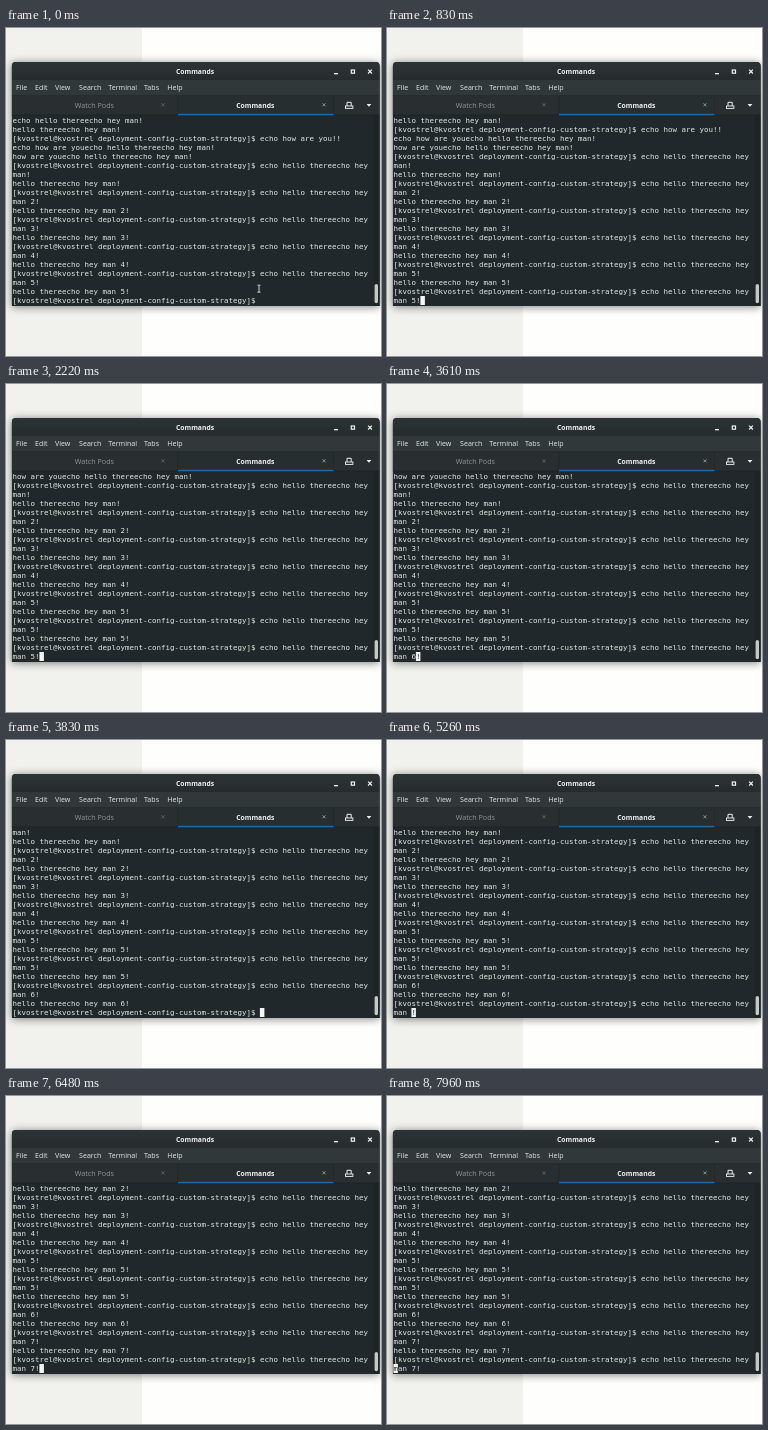
Recreate the animation shown at these times as an HTML page with a canvas. Size 375 px wide and 328 px high, loop 8000 ms.

```html
<!DOCTYPE html>
<html lang="en">
<head>
<meta charset="utf-8">
<title>Terminal</title>
<style>
  html, body { margin: 0; width: 100%; height: 100%; overflow: hidden; background: #fefefc; }
  canvas { display: block; }
</style>
</head>
<body>
<canvas id="stage" width="375" height="328"></canvas>
<script>
const ctx = document.getElementById('stage').getContext('2d');
const LOOP = 8000, COLS = 80, ROWS = 21;
const CELL_W = 4.5, CELL_H = 9, LEFT = 6.4, TOP = 88;
const MONO = '"DejaVu Sans Mono", monospace';
const SANS = '"Open Sans", "Noto Sans", sans-serif';
const BACK = '#21282b', INK = '#e2e7e4', ICON = '#eef1ef';
const PROMPT = '[kvostrel@kvostrel deployment-config-custom-strategy]$ ';
const GREETING = 'hello thereecho hey man';

// ---- Shell session ----
const echoed = n => [`${PROMPT}echo ${GREETING}${n}!`, `${GREETING}${n}!`];
const history = [
  `echo ${GREETING}!`,
  `${GREETING}!`,
  `${PROMPT}echo how are you!!`,
  `echo how are youecho ${GREETING}!`,
  `how are youecho ${GREETING}!`,
  ...['', ' 2', ' 3', ' 4', ' 5'].flatMap(echoed)
];

const show = s => { s.cursor = true; s.pointer = false; };
const hide = s => { s.cursor = false; };
const recall = s => { s.input = s.last; s.col = s.input.length; show(s); };
const left = s => { s.col--; show(s); };
const erase = s => {
  s.input = s.input.slice(0, s.col - 1) + s.input.slice(s.col);
  left(s);
};
const type = ch => s => {
  s.input = s.input.slice(0, s.col) + ch + s.input.slice(s.col);
  s.col++;
  show(s);
};
const enter = s => {
  s.log.push(PROMPT + s.input);
  s.last = s.input;
  s.input = s.prompt = '';
  s.col = 0;
  show(s);
};
const reply = s => { s.log.push(s.last.slice(5)); s.prompt = PROMPT; };

const script = [
  [430, show], [830, recall], [1040, hide], [1650, show],
  [1960, enter], [2000, reply], [2220, recall], [2830, hide],
  [3000, left], [3390, erase], [3610, type('6')], [3790, enter], [3830, reply],
  [4130, recall], [4700, left], [5260, erase],
  [5570, type('7'), enter, reply], [6170, hide], [6390, show], [6480, recall],
  [6740, left], [6910, left], [7350, left], [7830, left], [7900, left], [7960, left]
];

function sessionAfter(count) {
  const s = {
    log: [...history], prompt: PROMPT, input: '', col: 0,
    last: `echo ${GREETING} 5!`, cursor: false, pointer: true
  };
  for (const [, ...actions] of script.slice(0, count)) actions.forEach(act => act(s));
  return s;
}

// ---- Drawing helpers ----
function box(x, y, w, h, color) {
  ctx.fillStyle = color;
  ctx.fillRect(x, y, w, h);
}

function line(color, width, ...points) {
  ctx.strokeStyle = color;
  ctx.lineWidth = width;
  ctx.beginPath();
  points.forEach(([x, y]) => ctx.lineTo(x, y));
  ctx.stroke();
}

function outline(x, y, w, h, color, width) {
  ctx.strokeStyle = color;
  ctx.lineWidth = width;
  ctx.strokeRect(x, y, w, h);
}

// Large type scaled down keeps fractional glyph positions.
function text(str, x, y, size, color, family = SANS, weight = 400, align = 'left') {
  ctx.save();
  ctx.translate(x, y);
  ctx.scale(0.1, 0.1);
  ctx.font = `${weight} ${size * 10}px ${family}`;
  ctx.textAlign = align;
  ctx.fillStyle = color;
  ctx.fillText(str, 0, 0);
  ctx.restore();
}

function cross(x, y, r, color, width) {
  line(color, width, [x - r, y - r], [x + r, y + r]);
  line(color, width, [x - r, y + r], [x + r, y - r]);
}

function vertical(y0, y1, from, to) {
  const g = ctx.createLinearGradient(0, y0, 0, y1);
  g.addColorStop(0, from);
  g.addColorStop(1, to);
  return g;
}

// ---- Window ----
function drawFrame() {
  box(0, 0, 375, 328, '#fefefc');
  box(0, 0, 136, 328, '#f1f2ee');

  ctx.save();
  ctx.shadowColor = 'rgba(0,0,0,0.5)';
  ctx.shadowBlur = 9;
  ctx.shadowOffsetY = 1;
  ctx.fillStyle = BACK;
  ctx.beginPath();
  ctx.roundRect(5.9, 34, 367.7, 244, [4, 4, 0, 0]);
  ctx.fill();
  ctx.shadowColor = 'transparent';
  ctx.clip();
  box(5, 34, 370, 18, vertical(34, 52, '#2c3335', '#262c2e'));
  box(5, 52, 370, 16, '#31383a');
  box(5, 68, 370, 19, '#292f30');
  box(172, 68, 155.5, 19, '#272e30');
  box(5, 67.5, 370, 0.5, '#1c2224');
  box(171.7, 68, 0.5, 19, '#1c2224');
  box(327.3, 68, 0.5, 19, '#1c2224');
  box(5, 86.6, 370, 0.7, '#1b2123');
  box(172, 85.8, 155.5, 1.5, '#2068a8');
  box(367.8, 87.3, 7, 191, '#1d2426');
  ctx.restore();

  text('Commands', 189, 46, 6.8, '#f0f3f1', SANS, 700, 'center');
  box(328, 45, 4, 1.3, ICON);
  outline(345.3, 42, 3.2, 3.2, ICON, 1.2);
  cross(364, 43.6, 1.9, ICON, 1.2);

  const menu = { File: 10, Edit: 29, View: 49, Search: 73, Terminal: 102.3, Tabs: 138, Help: 161.2 };
  for (const [label, x] of Object.entries(menu)) text(label, x, 62.4, 7.1, '#e6eae8');

  text('Watch Pods', 88.4, 79.6, 7.2, '#8f9796', SANS, 400, 'center');
  cross(157, 76.8, 1.5, '#697170', 0.8);
  text('Commands', 249.3, 79.6, 6.8, '#f0f3f1', SANS, 700, 'center');
  cross(318, 76.8, 1.5, '#a3aaa8', 0.8);

  line(ICON, 1, [341, 78], [341, 74.3], [345.2, 74.3], [345.2, 78]);
  outline(339.5, 78, 7.4, 2.4, ICON, 0.9);
  ctx.fillStyle = ICON;
  ctx.beginPath();
  ctx.moveTo(360.6, 76);
  ctx.lineTo(365.4, 76);
  ctx.lineTo(363, 78.7);
  ctx.fill();

  ctx.fillStyle = '#c4c9c6';
  ctx.beginPath();
  ctx.roundRect(368.6, 256, 3.4, 19.3, 1.7);
  ctx.fill();
}

function glyph(ch, col, row, color) {
  if (ch && ch !== ' ') text(ch, LEFT + col * CELL_W, TOP + row * CELL_H + 7, 7.5, color, MONO);
}

function drawSession(s) {
  const wrap = str => str.match(new RegExp(`.{1,${COLS}}`, 'g')) || [''];
  const rows = [...s.log, s.prompt + s.input].flatMap(wrap).slice(-ROWS);
  rows.forEach((str, row) => [...str].forEach((ch, col) => glyph(ch, col, row, INK)));

  if (s.cursor) {
    const col = (s.prompt.length + s.col) % COLS, row = ROWS - 1;
    box(LEFT + col * CELL_W, TOP + row * CELL_H, CELL_W, CELL_H, '#f4f6f4');
    glyph(rows[row][col], col, row, BACK);
  }
  if (s.pointer) {
    line('#e8ecea', 0.9, [253, 257.5], [253, 264]);
    line('#e8ecea', 0.8, [251.4, 257.2], [254.6, 257.2]);
    line('#e8ecea', 0.8, [251.4, 264.2], [254.6, 264.2]);
  }
}

// ---- Playback ----
let drawn = -1;
const start = performance.now();

function tick() {
  const t = (performance.now() - start) % LOOP;
  const count = script.filter(([at]) => at <= t).length;
  if (count !== drawn) {
    drawn = count;
    drawFrame();
    drawSession(sessionAfter(count));
  }
  requestAnimationFrame(tick);
}
tick();
</script>
</body>
</html>
```
